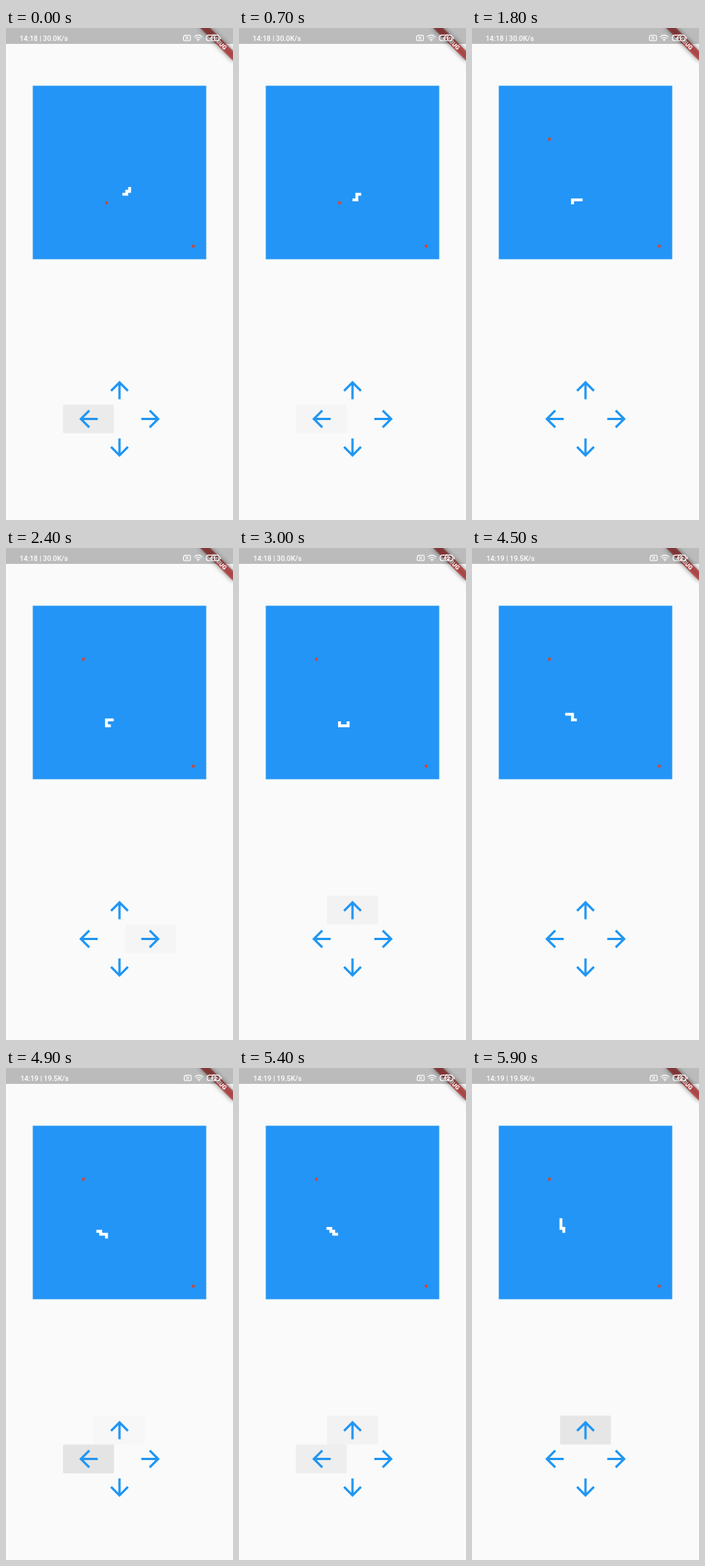
Recreate the animation shown at these times as an HTML page. Size 300 px wide and 650 px high, loop 6000 ms.

```html
<!DOCTYPE html>
<html lang="en">
<head>
<meta charset="utf-8">
<title>Snake</title>
<style>
  html, body { margin: 0; width: 100%; height: 100%; overflow: hidden; background: #fafafa; }
  svg { display: block; width: 300px; height: 650px; }
  text { font-family: Roboto, sans-serif; fill: #fff; }
  .line { fill: none; stroke: #fff; stroke-width: 1.1; stroke-linecap: round; stroke-linejoin: round; }
  .blur { filter: blur(3px); }
</style>
</head>
<body>
<svg viewBox="0 0 300 650">
  <defs>
    <path id="arrow" fill="#2196f3" transform="scale(1.53) translate(-12 -12)"
      d="M4 12l1.41 1.41L11 7.83V20h2V7.83l5.58 5.59L20 12l-8-8-8 8z"/>
  </defs>
  <rect x="35.4" y="76.3" width="229.2" height="229.2" fill="#2395f6"/>
  <path id="food" fill="#e53e26"/>
  <path id="snake" fill="#fff"/>
  <g id="pad"></g>

  <g transform="translate(300 0) rotate(45)">
    <rect class="blur" x="-31" y="21.4" width="62" height="9.2" opacity=".5"/>
    <rect x="-31" y="21.4" width="62" height="9.2" fill="#b71c1c" fill-opacity=".63"/>
    <text y="28.8" font-size="7.8" font-weight="900" text-anchor="middle">DEBUG</text>
  </g>

  <rect width="300" height="21" opacity=".255"/>
  <g id="status">
    <text id="clock" x="18" y="16.6" font-size="9.4" font-weight="500"></text>
    <path class="line" d="M236.5 9.5h6q1.2 0 1.2 1.2v4.8q0 1.2-1.2 1.2h-6.8q-1.2 0-1.2-1.2v-4zM237.4 11.4l3.4 3.4M240.8 11.4l-3.4 3.4"/>
    <path class="line" d="M248.8 11.6q5.2-4.4 10.4 0M250.6 13.6q3.4-2.8 6.8 0M252.5 15.4q1.5-1.1 3 0"/>
    <circle cx="254" cy="16.7" r=".8" fill="#fff"/>
    <rect class="line" x="264.8" y="9.4" width="17" height="7.4" rx="3"/>
    <path class="line" d="M283.4 12v2.2"/>
    <text id="charge" x="273.3" y="15.9" font-size="7.4" font-weight="700" text-anchor="middle"></text>
  </g>
</svg>
<script>
const LOOP = 6000, FRAME = 100, STEP = 204, LEAD = 40;
const CELL = 3.82, LEFT = 35.4, TOP = 76.3;
const $ = id => document.getElementById(id);

// Arrow centre, rotation and press times of each button
const buttons = [
  { x: 150, y: 478.3, turn: 0, presses: [2739, 3639, 4583, 4980, 5380, 5772] },
  { x: 109, y: 516.5, turn: -90, presses: [-183, 400, 3130, 4130, 4800, 5180] },
  { x: 191, y: 516.5, turn: 90, presses: [2100] },
  { x: 150, y: 554.5, turn: 180, presses: [60] }
];

function add(tag, attrs) {
  const el = document.createElementNS('http://www.w3.org/2000/svg', tag);
  for (const key in attrs) el.setAttribute(key, attrs[key]);
  return $('pad').appendChild(el);
}

for (const b of buttons) {
  b.glow = add('rect', { x: b.x - 33.7, y: b.y - 19.1, width: 67.4, height: 38.2, rx: 1.6 });
  add('use', { href: '#arrow', transform: `translate(${b.x} ${b.y}) rotate(${b.turn})` });
}

// Every cell the head visits, from the first tail onwards
const dirs = { U: [0, -1], D: [0, 1], L: [-1, 0], R: [1, 0] };
const trail = [[33, 35]];
for (const m of 'DLDLDDLLLLLLDDRRRUULLLUULLULULUUU') {
  const [x, y] = trail[trail.length - 1];
  trail.push([x + dirs[m][0], y + dirs[m][1]]);
}

const cells = (list, inset = 0) => list.map(([x, y]) => {
  const s = CELL - 2 * inset;
  return `M${LEFT + x * CELL + inset} ${TOP + y * CELL + inset}h${s}v${s}h${-s}z`;
}).join('');

function glow(age) {
  if (age < 0 || age > 350) return 0;
  return 0.09 * Math.min(1, age / 60, (350 - age) / 250);
}

function draw(t) {
  const step = Math.floor((t + LEAD) / STEP);
  const head = step + 4, size = step < 10 ? 5 : 6;
  $('snake').setAttribute('d', cells(trail.slice(head - size + 1, head + 1)));
  $('food').setAttribute('d', cells([step < 9 ? [25, 40] : [17, 18], [55, 55]], 0.2));

  for (const b of buttons)
    b.glow.setAttribute('opacity', Math.max(...b.presses.map(p => glow(t - p))));

  const late = t >= 3000;
  $('status').setAttribute('transform', `translate(${late ? 1 : 0} 0)`);
  $('clock').textContent = t < 3300 ? '14:18 | 30.0K/s' : '14:19 | 19.5K/s';
  $('charge').textContent = late ? '42' : '41';
}

const start = performance.now();
function tick() {
  const t = (performance.now() - start) % LOOP;
  draw(Math.floor(t / FRAME) * FRAME);
  requestAnimationFrame(tick);
}
tick();
</script>
</body>
</html>
```
